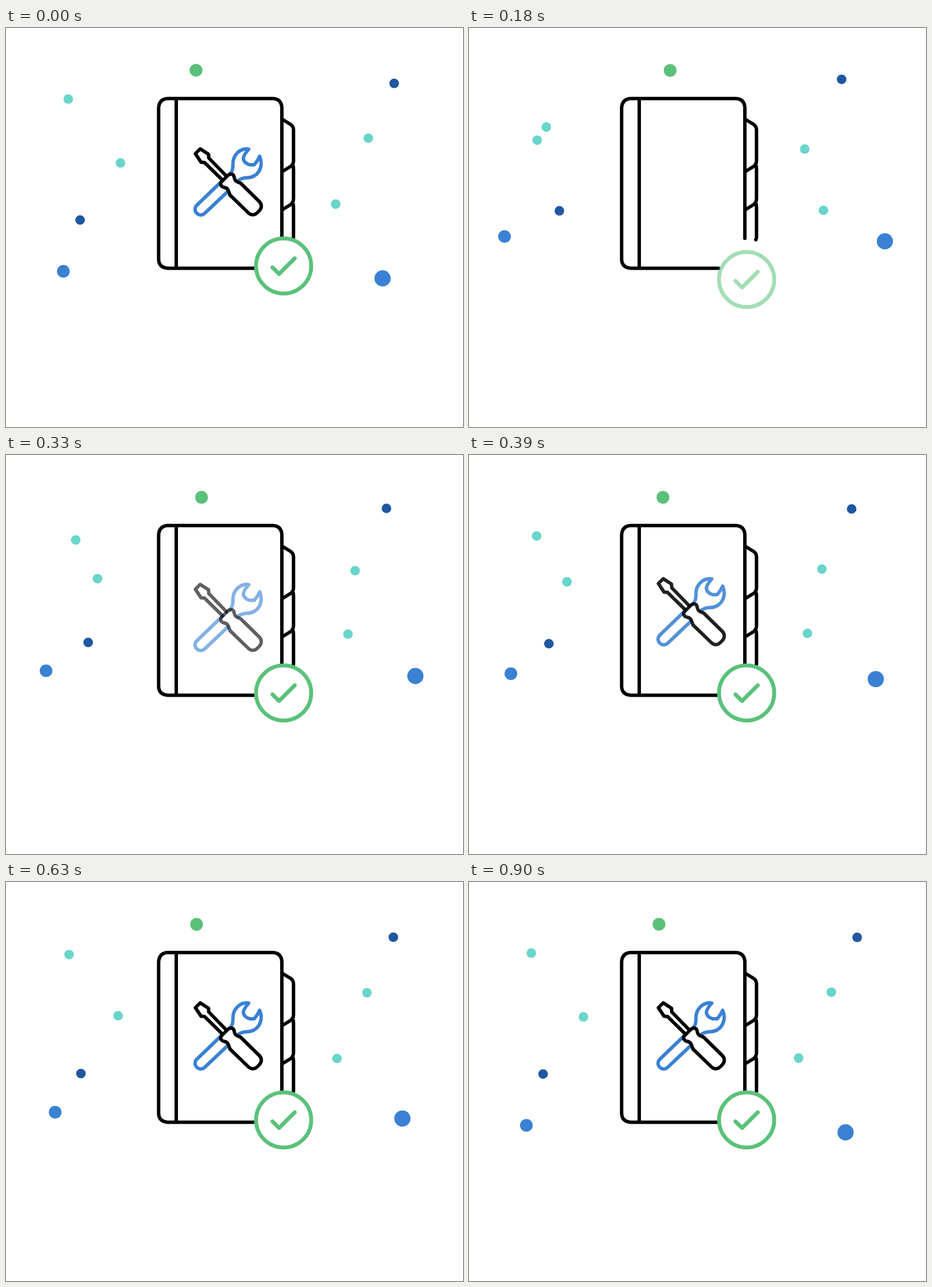
Write an HTML page that moves like this. It is 800x700 px and loops after 930 ms.

```html
<!DOCTYPE html>
<html lang="en">
<head>
<meta charset="utf-8">
<title>Manual with tools</title>
<style>
  html, body { margin: 0; width: 100%; height: 100%; overflow: hidden; background: #fff; }
  svg { display: block; width: 800px; height: 700px; }
  .line { fill: none; stroke: #000; stroke-width: 6; stroke-linecap: round; stroke-linejoin: round; }
  .wrench { stroke: #3a81d3; }
  .badge { stroke: #5ac17a; stroke-width: 6.8; }
</style>
</head>
<body>
<svg viewBox="0 0 800 700">
  <g id="dots"></g>

  <g class="line">
    <path d="M437 421.5H283Q267.2 420 267.2 405.500V139.500Q268.500 124.500 283 123.700H467Q482 124.500 482.900 139.500V369"/>
    <path d="M298 124V421"/>
    <path d="M485 161L498 169Q503.300 172.500 503.300 179V233Q503.300 240 498 243L485 251"/>
    <path d="M501.500 239Q503.300 242 503.300 247V299Q503.300 306.500 498 310L485 318"/>
    <path d="M501.500 306Q503.300 309 503.300 314V366Q503.300 369.500 502 371.500"/>
  </g>

  <g id="tools">
    <path class="line wrench" d="M376.500 270L334 311C330 315 330 321 334 325C338 329 344 329 348 325L388 287"/>
    <path class="line wrench" d="M391.500 257C396 252 397.300 248 397.300 238C397.300 222 411 210 425 212.500C422 216 415.500 223 415.500 229C416 235 422 239 427 240L434.500 240C438 236 442 230 444 225C449 236 447 249 438 257C431 263 424 262.500 418 263C413 264 409 265 406 268"/>
    <path class="line" d="M379 267L347.500 236L341.500 235.500L331.500 220.500L340 212L354.500 221.500L355 228L386 260"/>
    <path class="line" d="M377 270L389 258C393 255 398 256 399 260C400 264 400 266 402 268C405 271 409 271 411 272.500L443 304C448 309 448 315 444 320L440 324C435 329 429 329 424 324L392 293C391 290 390.500 287 388 283C385 279 380 280 378 278C375 275 375 272.500 377 270Z"/>
  </g>

  <g id="badge">
    <circle class="line badge" cx="486" cy="417.5" r="48.3"/>
    <path class="line badge" d="M466.500 420L478 431.500L505.500 404"/>
  </g>
</svg>

<script>
const LOOP = 930, STEP = 30, START = 30, END = 900;
const CYAN = '#69d5cb', NAVY = '#1f57a0', GREEN = '#5ac17a', BLUE = '#3a81d3';

const clamp = v => Math.min(1, Math.max(0, v));
const span = (t, a, b) => clamp((t - a) / (b - a));
const byId = id => document.getElementById(id);

// Resting place, radius, colour, and offset at the start of the burst
const burst = [
  [109, 124.7, 8.4, CYAN, 46.5, 86.5],
  [200.4, 236.7, 8.4, CYAN, -143, -70.4],
  [634.3, 193.3, 8.4, CYAN, -82.2, 33.7],
  [577.1, 309, 8.4, CYAN, 76.5, 19.2],
  [129.7, 336.9, 8.4, NAVY, 50.3, -28.5],
  [679.5, 97.2, 8.4, NAVY, -48, -12.6],
  [332.6, 74.2, 11.2, GREEN, 34.4, 0.4]
].map(([x, y, r, color, dx, dy]) => ({ x, y, dx, dy, el: addDot(r, color) }));

const leftDot = addDot(11.1, BLUE);
const rightDot = addDot(14.2, BLUE);

function addDot(r, color) {
  const el = document.createElementNS('http://www.w3.org/2000/svg', 'circle');
  el.setAttribute('r', r);
  el.setAttribute('fill', color);
  byId('dots').append(el);
  return el;
}

function place(el, x, y) {
  el.setAttribute('cx', x);
  el.setAttribute('cy', y);
}

// Fade each stroke on its own so crossings show while translucent
function rise(group, left, distance) {
  group.setAttribute('transform', `translate(0 ${left * distance})`);
  for (const el of group.children) el.style.opacity = 1 - left;
}

function draw(t) {
  const left = 1 - span(t, START, END);
  const eased = left ** 3;
  for (const d of burst) place(d.el, d.x + d.dx * eased, d.y + d.dy * eased);

  place(leftDot, 100.4 - 46.2 * left, 426.9 - 73.9 * left);
  place(rightDot,
    739.4 - 54.6 * span(t, START, 750) - 25.6 * span(t, 750, END),
    439.3 - 78.7 * left);

  rise(byId('badge'), 1 - span(t, 30, 300), 53.4);
  rise(byId('tools'), 1 - span(t, 180, 420), 40);
}

const origin = performance.now();
function tick() {
  const t = Math.floor((performance.now() - origin) % LOOP / STEP) * STEP;
  draw(t < START ? END : t);
  requestAnimationFrame(tick);
}
tick();
</script>
</body>
</html>
```
